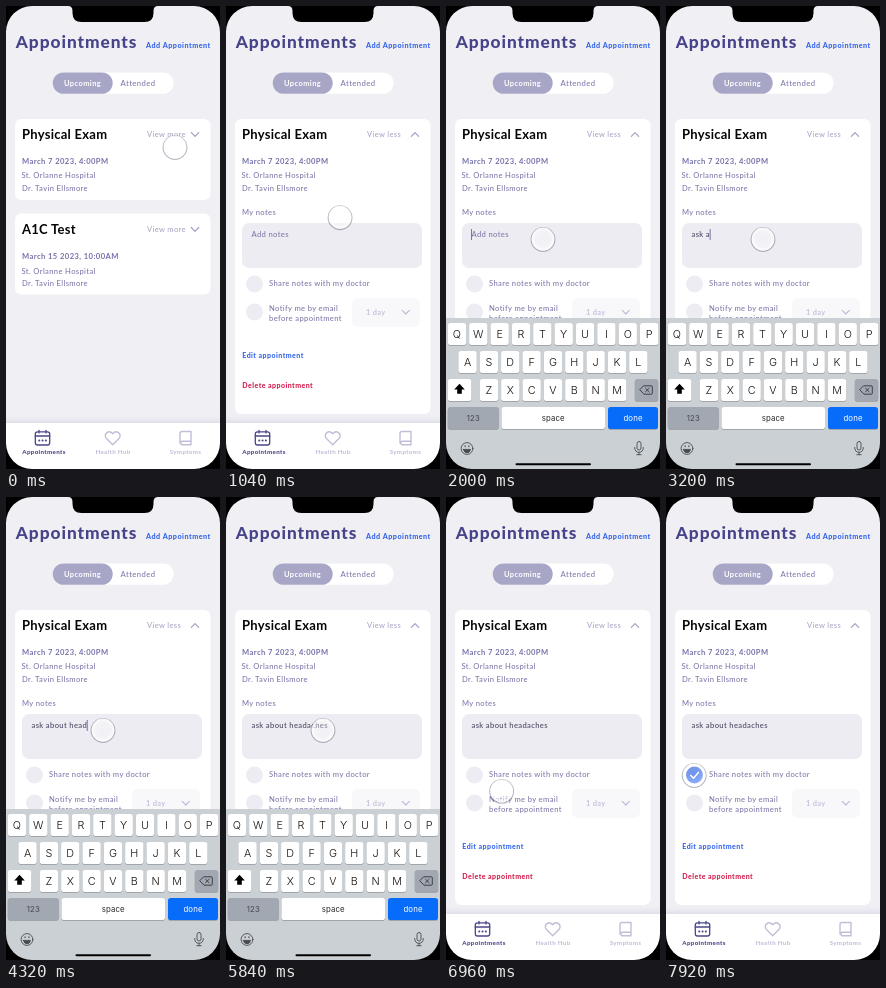
Animation of 214x463 px, one loop 8000 ms. Source, as an HTML page:

```html
<!DOCTYPE html>
<html lang="en">
<head>
<meta charset="utf-8">
<title>Appointments</title>
<style>
html, body { margin: 0; width: 100%; height: 100%; overflow: hidden; background: #000; }
svg { display: block; width: 100vw; height: 100vh; }
text { font-family: Lato, "Open Sans", sans-serif; white-space: pre; }
.body { font-size: 7.6px; letter-spacing: .36px; font-weight: 500; fill: #7f7bab; }
.pale { font-size: 7.5px; letter-spacing: .36px; font-weight: 500; fill: #a9a7c6; }
.date { font-size: 7.6px; letter-spacing: .43px; font-weight: 700; fill: #7672aa; }
.head { font-size: 13px; letter-spacing: .26px; font-weight: 700; fill: #050505; }
.link { font-size: 7px; letter-spacing: .45px; font-weight: 800; }
.tab { font-size: 6.2px; letter-spacing: .33px; font-weight: 800; text-anchor: middle; fill: #c3c1d9; }
.key { font-family: Inter, Roboto, sans-serif; font-size: 10.8px; font-weight: 300; text-anchor: middle; }
.small { font-size: 7.8px; font-weight: 400; letter-spacing: .15px; }
.line { fill: none; stroke-linecap: round; stroke-linejoin: round; }
</style>
</head>
<body>
<svg viewBox="0 0 214 463" preserveAspectRatio="none">
  <defs>
    <clipPath id="cardClip"><rect id="cardClipBox" x="9" y="113" width="195.5" rx="6"/></clipPath>
    <linearGradient id="blue" x1="0" y1="0" x2=".4" y2="1">
      <stop offset="0" stop-color="#2558dc"/><stop offset="1" stop-color="#4d80f4"/>
    </linearGradient>
    <radialGradient id="glass">
      <stop offset="0" stop-color="#fff" stop-opacity=".25"/>
      <stop offset=".7" stop-color="#fff" stop-opacity=".35"/>
      <stop offset="1" stop-color="#fff" stop-opacity=".95"/>
    </radialGradient>
    <filter id="blur" x="-30%" y="-30%" width="160%" height="160%">
      <feGaussianBlur stdDeviation=".7"/>
    </filter>
    <filter id="navShade" x="-10%" y="-40%" width="120%" height="180%">
      <feDropShadow dx="0" dy="-1" stdDeviation="3" flood-color="#8d8bb5" flood-opacity=".28"/>
    </filter>
  </defs>

  <rect width="214" height="463" fill="#efeff4"/>
  <text x="9.8" y="42" font-size="17.3" font-weight="800" letter-spacing=".95" fill="#47438a">Appointments</text>
  <text x="140" y="42.2" font-size="7.2" font-weight="800" letter-spacing=".5" fill="#3565ea">Add Appointment</text>
  <rect x="46.7" y="66.4" width="121" height="21.4" rx="10.7" fill="#fff"/>
  <rect x="46.7" y="66.4" width="60" height="21.4" rx="10.7" fill="#a8a6c7"/>
  <text x="58" y="80" font-size="7.5" font-weight="700" letter-spacing=".4" fill="#fff">Upcoming</text>
  <text x="114.6" y="80" font-size="7.7" font-weight="500" letter-spacing=".4" fill="#7f7bab">Attended</text>

  <g id="second">
    <rect x="9" y="207.5" width="195.5" height="81" rx="6" fill="#fff"/>
    <text class="head" x="16" y="227.5">A1C Test</text>
    <text class="pale" x="141" y="226">View more</text>
    <path class="line" d="M185.3 221.5l3.7 3.8 3.7-3.8" stroke="#a3a0c4" stroke-width="1.2"/>
    <text class="date" x="16" y="253">March 15 2023, 10:00AM</text>
    <text class="body" x="15.5" y="267.5">St. Orlanne Hospital</text>
    <text class="body" x="16" y="280">Dr. Tavin Ellsmore</text>
  </g>

  <rect id="card" x="9" y="113" width="195.5" rx="6" fill="#fff"/>
  <text class="head" x="16" y="132.5">Physical Exam</text>
  <text class="pale" id="view" x="141" y="131"></text>
  <path class="line" id="chevron" d="M-3.7-1.9L0 1.9 3.7-1.9" stroke="#a3a0c4" stroke-width="1.2"/>
  <text class="date" x="16" y="158.2">March 7 2023, 4:00PM</text>
  <text class="body" x="15.5" y="172.3">St. Orlanne Hospital</text>
  <text class="body" x="16" y="184.8">Dr. Tavin Ellsmore</text>

  <g clip-path="url(#cardClip)"><g id="details">
    <text class="body" x="16" y="208.5">My notes</text>
    <rect x="16" y="217" width="180" height="45" rx="7" fill="#edecf2"/>
    <text class="body" id="note" x="25.5" y="231"></text>
    <rect id="caret" y="223" width=".8" height="11" fill="#5d5a90"/>
    <circle cx="28.5" cy="278" r="8.5" fill="#edecf2"/>
    <g id="check">
      <circle cx="28.5" cy="278" r="8.5" fill="url(#blue)"/>
      <path class="line" d="M24.8 278.4l2.7 2.8 4.9-5.8" stroke="#fff" stroke-width="1.5"/>
    </g>
    <text class="body" x="43" y="280">Share notes with my doctor</text>
    <circle cx="28.5" cy="306" r="8.5" fill="#edecf2"/>
    <text class="body" x="43" y="304.7">Notify me by email</text>
    <text class="body" x="43" y="314.7">before appointment</text>
    <rect x="126" y="292" width="68" height="29" rx="6" fill="#f8f8fb"/>
    <text x="140" y="309" font-size="7.4" font-weight="700" letter-spacing=".35" fill="#c5c3da">1 day</text>
    <path class="line" d="M176.3 304.4l3.5 3.6 3.5-3.6" stroke="#c0bed7" stroke-width="1.2"/>
    <text class="link" x="16.3" y="352" fill="#3565ea">Edit appointment</text>
    <text class="link" x="16.3" y="381.5" fill="#d3204f">Delete appointment</text>
  </g></g>

  <rect x="-10" y="417" width="234" height="56" fill="#fff" filter="url(#navShade)"/>
  <g class="line" stroke="#4a4689" stroke-width="1.3">
    <rect x="29.3" y="425.8" width="14.4" height="13.2" rx="2.2"/>
    <path d="M29.3 430h14.4M33 424.3v2.6M40 424.3v2.6"/>
    <path d="M33.2 434.4h.1M36.5 434.4h.1M39.8 434.4h.1" stroke-width="2"/>
  </g>
  <g class="line" stroke="#c0bed8" stroke-width="1.4">
    <path d="M106.7 438.8l-6.2-6.2c-3.8-4.2 2.2-9.4 6.2-4.8 4-4.6 10 .6 6.2 4.8z"/>
    <path d="M185 435.2h-9a2 2 0 0 0 0 3.6h9zM174 437v-9.5q0-2 2-2h9v10"/>
  </g>
  <text class="tab" x="38" y="448.3" style="fill:#4a4689">Appointments</text>
  <text class="tab" x="107" y="448.3">Health Hub</text>
  <text class="tab" x="179.5" y="448.3">Symptoms</text>

  <g id="keyboard">
    <rect y="312" width="214" height="156" fill="#cbd0d4"/>
    <g id="keys"></g>
    <path d="M13.5 377.8l5.3 5.7h-3v4.2h-4.6v-4.2h-3z" fill="#000"/>
    <g class="line" stroke="#33363c" stroke-width=".9">
      <path d="M198 379.8h7.3q1 0 1 1v6.4q0 1-1 1H198l-4-4.2zM199.5 382.2l3.6 3.6M203.1 382.2l-3.6 3.6"/>
      <g stroke="#484c52">
        <circle cx="21" cy="442.5" r="5.9"/>
        <path d="M17.5 443.4h7q-.7 3.400-3.500 3.400t-3.500-3.400z" fill="#484c52"/>
        <path d="M19.100 439.800v.8M22.900 439.800v.8" stroke-width="1.200"/>
        <rect x="191" y="435.5" width="4" height="8.5" rx="2"/>
        <path d="M188.7 441.5q0 4.8 4.3 4.8t4.3-4.8M193 446.3v2.4M190.8 448.7h4.4"/>
      </g>
    </g>
    <rect x="69.5" y="457.2" width="75.5" height="2.1" rx="1" fill="#000"/>
  </g>

  <g id="touch">
    <circle cy=".5" r="11.8" fill="none" stroke="#50506a" stroke-opacity=".4" stroke-width="1.3" filter="url(#blur)"/>
    <circle r="11.4" fill="url(#glass)"/>
  </g>

  <path fill="#000" fill-rule="evenodd" d="M0 0H214V463H0ZM26 0H62Q66.5 0 66.5 5V7Q66.5 16 75.500 16H138.500Q147.500 16 147.500 7V5Q147.500 0 152 0H188A26 26 0 0 1 214 26V437A26 26 0 0 1 188 463H26A26 26 0 0 1 0 437V26A26 26 0 0 1 26 0Z"/>
</svg>

<script>
const LOOP = 8000;
const NOTE = "ask about headaches";
const TYPE_START = 2440, TYPE_STEP = 132;
const HIDE_START = 5850, HIDE_END = 6100;
const $ = id => document.getElementById(id);
const clamp = v => Math.max(0, Math.min(1, v));
const span = (t, a, b) => clamp((t - a) / (b - a));
const easeOut = p => 1 - (1 - p) ** 2;
const easeInOut = p => (1 - Math.cos(Math.PI * p)) / 2;
const set = (id, attrs) => {
  for (const k in attrs) $(id).setAttribute(k, attrs[k]);
};

function keyCap(x, y, w, label, fill = "#fff", ink = "#111", small = false) {
  const dy = small ? 14 : 15;
  return `<rect x="${x}" y="${y + 0.7}" width="${w}" height="22" rx="2.8" fill="#94989d"/>
    <rect x="${x}" y="${y}" width="${w}" height="22" rx="2.8" fill="${fill}"/>
    <text class="key${small ? " small" : ""}" x="${x + w / 2}" y="${y + dy}" fill="${ink}">${label}</text>`;
}

function buildKeys() {
  const rows = [["QWERTYUIOP", 1.8], ["ASDFGHJKL", 12.4], ["ZXCVBNM", 33.8]];
  let out = "";
  rows.forEach(([letters, x], r) => {
    [...letters].forEach((c, i) => { out += keyCap(x + i * 21.35, 317 + r * 28, 18.3, c); });
  });
  out += keyCap(1.8, 373, 23.5, "");
  out += keyCap(188.8, 373, 23.4, "", "#a2a8b1");
  out += keyCap(1.8, 401, 51, "123", "#a2a8b1", "#43474d", true);
  out += keyCap(55.5, 401, 103.5, "space", "#fff", "#2a2a2a", true);
  out += keyCap(162, 401, 50, "done", "#086cfb", "#fff", true);
  $("keys").innerHTML = out;
}

// Straight legs of the touch point: start, end, destination, easing
const legs = [
  [500, 1300, 97, 233, easeInOut],
  [HIDE_START, HIDE_END, 142.5, 344, easeOut],
  [6260, 7300, 28.2, 278, easeInOut]
];

function touchAt(t) {
  let x = 169, y = 141;
  for (const [a, b, tx, ty, ease] of legs) {
    const p = ease(span(t, a, b));
    x += (tx - x) * p;
    y += (ty - y) * p;
  }
  return [x, y];
}

function draw(t) {
  const open = easeOut(span(t, 300, 620));
  const height = 81 + 214 * open;
  set("card", { height });
  set("cardClipBox", { height });
  set("second", { transform: `translate(0 ${214 * open})` });
  set("details", { opacity: open });
  set("chevron", { transform: `translate(189 128.5) scale(1 ${1 - 2 * open})` });
  $("view").textContent = open > 0.5 ? "View less" : "View more";

  const up = easeOut(span(t, 1820, 1990)) - easeOut(span(t, HIDE_START, HIDE_END));
  set("keyboard", { transform: `translate(0 ${155 * (1 - up)})` });

  const count = Math.max(0, Math.min(NOTE.length, Math.floor((t - TYPE_START) / TYPE_STEP)));
  const note = $("note");
  note.textContent = count ? NOTE.slice(0, count) : "Add notes";
  note.style.fill = count ? "#4b4962" : "#7f7bab";
  const typing = count > 0 && count < NOTE.length;
  const focused = t >= 1840 && t < HIDE_START;
  const lit = typing || Math.floor(t / 500) % 2 === 0;
  set("caret", {
    x: 25.2 + (count ? note.getComputedTextLength() : 0),
    visibility: focused && lit ? "visible" : "hidden"
  });

  set("check", { opacity: span(t, 7400, 7560) });
  set("touch", { transform: `translate(${touchAt(t)})` });
}

buildKeys();
const start = performance.now();
function frame() {
  draw((performance.now() - start) % LOOP);
  requestAnimationFrame(frame);
}
frame();
</script>
</body>
</html>
```
